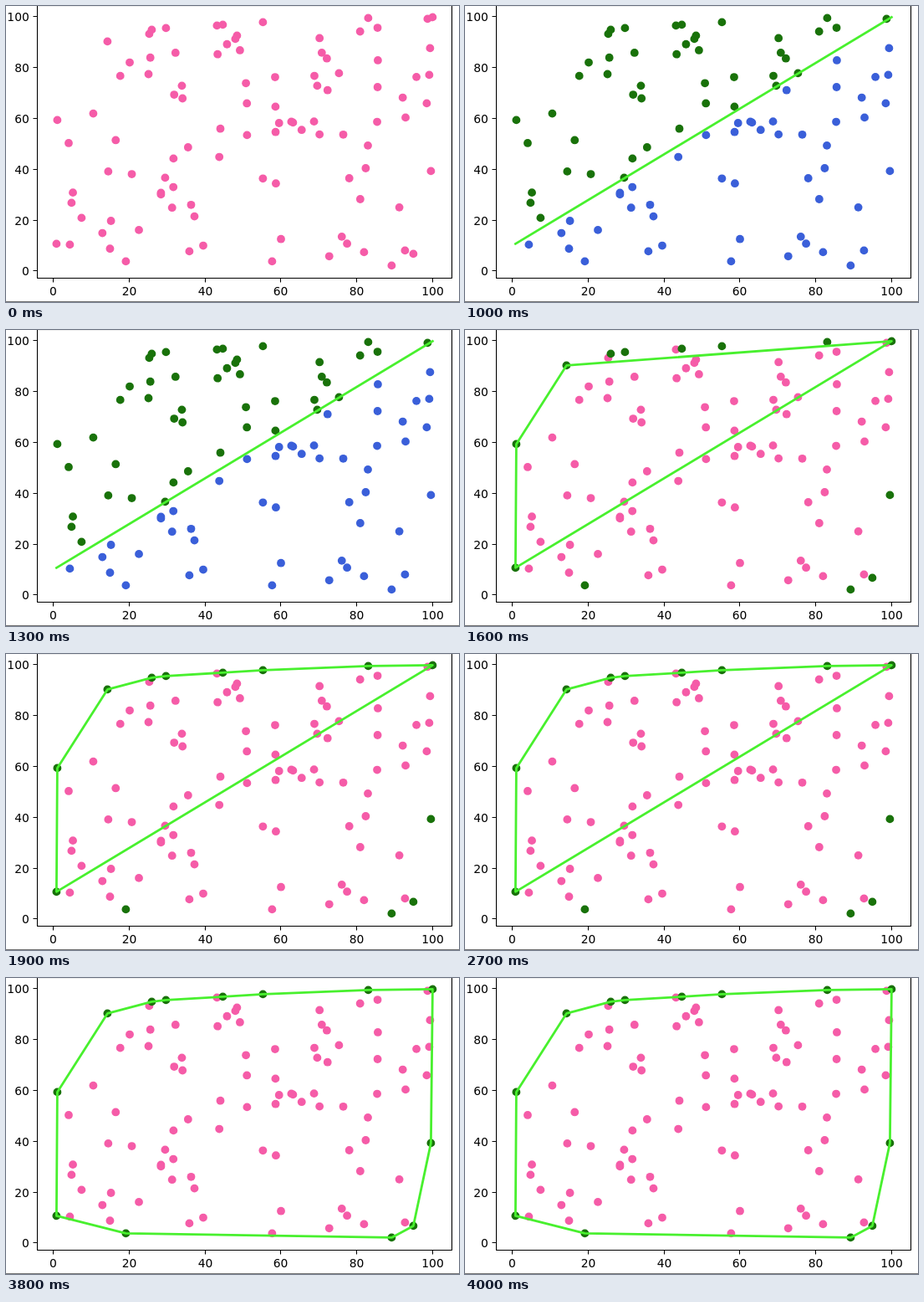
Recreate the animation shown at these times as an HTML page. Size 542 px wide and 354 px high, loop 4.8 s.

```html
<!DOCTYPE html>
<html lang="en">
<head>
<meta charset="utf-8">
<title>Convex hull</title>
<style>
html, body { margin: 0; width: 100%; height: 100%; overflow: hidden; background: #fff; }
svg { display: block; width: 542px; height: 354px; }
text { font: 13.89px "DejaVu Sans", sans-serif; fill: #000; stroke: none; }
</style>
</head>
<body>
<svg viewBox="0 0 542 354">
  <rect width="542" height="354" fill="#fff"/>
  <g transform="translate(.4 .4)">
    <g id="dots"></g>
    <path id="line" fill="none" stroke="#48f02e" stroke-width="2.8" stroke-linejoin="round" stroke-linecap="square"/>
  </g>
  <g id="axes" fill="none" stroke="#000" stroke-width="1.1"></g>
  <path d="M0 353.5H542" stroke="#777"/>
</svg>
<script>
const LOOP = 4800;
const PINK = '#f55ca8', GREEN = '#19720a', BLUE = '#3a5fd9';

// Hull corners in the order they join; the first two span the dividing line
const hull = [
  [60, 284], [510, 13], [121, 42], [61, 136], [191, 26], [174, 28], [307, 19],
  [433, 14], [259, 22], [487, 296], [508, 197], [461, 310], [143, 305]
];
// Inner points that touch a line or another point
const landmarks = [
  [171, 33], [252, 23], [504, 15], [190, 205], [372, 95], [398, 80], [322, 120], [288, 154],
  [76, 285], [428, 294], [477, 292], [318, 305], [219, 293], [507, 50], [506, 82], [503, 116],
  [78, 235], [90, 253], [276, 35], [274, 39], [341, 138], [343, 139], [185, 223], [185, 225]
];
// [start, number of corners joined]
const steps = [
  [0, 0], [1000, 2], [1600, 4], [1700, 5], [1800, 6], [1900, 8],
  [2500, 9], [2900, 10], [3200, 11], [3800, 13]
];
const UPPER = 40, LOWER = 47;   // inner points on each side of the line
const extremes = [0, 1, 2, 9];  // corners hidden while the set is split

const byId = id => document.getElementById(id);

function add(parent, tag, attrs, text = '') {
  const el = document.createElementNS('http://www.w3.org/2000/svg', tag);
  for (const key in attrs) el.setAttribute(key, attrs[key]);
  el.textContent = text;
  parent.append(el);
  return el;
}

// Signed distance of p from the line a-b, positive to the right on screen
function side(a, b, p) {
  const dx = b[0] - a[0], dy = b[1] - a[1];
  return (dx * (p[1] - a[1]) - dy * (p[0] - a[0])) / Math.hypot(dx, dy);
}
const height = p => -side(hull[0], hull[1], p);

function around(points) {
  const angle = ([x, y]) => Math.atan2(y - 160, x - 285);
  return [...points].sort((a, b) => angle(a) - angle(b));
}

function randomFrom(seed) {
  return () => (seed = seed * 48271 % 2147483647) / 2147483647;
}

// Fill the hull with scattered points, clear of its edges and the dividing line
function scatter() {
  const random = randomFrom(2024);
  const ring = around(hull), points = [...landmarks];
  let up = points.filter(p => height(p) > 0).length, down = points.length - up;
  while (up < UPPER || down < LOWER) {
    const p = [60 + 450 * random(), 13 + 297 * random()];
    const above = height(p) > 0;
    const inside = ring.every((a, i) => side(a, ring[(i + 1) % ring.length], p) > 8);
    const free = points.every(q => Math.hypot(p[0] - q[0], p[1] - q[1]) > 9);
    if (!inside || !free || Math.abs(height(p)) < 8) continue;
    if (above ? up >= UPPER : down >= LOWER) continue;
    points.push(p);
    above ? up++ : down++;
  }
  return points;
}

function drawAxes() {
  const axes = byId('axes');
  add(axes, 'path', { d: 'M37.5 0V325.5M533.5 0V325.5M37 325.5H534' });
  add(axes, 'path', { d: 'M38 0H533', stroke: '#ddd' });
  const snap = v => Math.floor(v) + 0.5;
  for (let v = 0; v <= 100; v += 20) {
    const x = snap(56.5 + 4.54 * v), y = snap(316.9 - 3.043 * v);
    add(axes, 'path', { d: `M${x} 325.5v5M37.5 ${y}h-5` });
    add(axes, 'text', { x, y: 346, 'text-anchor': 'middle' }, v);
    add(axes, 'text', { x: 27.8, y: y + 5.5, 'text-anchor': 'end' }, v);
  }
}

function addDot(point) {
  const el = add(byId('dots'), 'circle', { cx: point[0], cy: point[1], r: 4.9 });
  return { el, sideColor: height(point) > 0 ? GREEN : BLUE };
}

drawAxes();
const innerDots = scatter().map(addDot), hullDots = hull.map(addDot);

function render(ms) {
  const t = ms % LOOP;
  const joined = steps.filter(([start]) => start <= t).pop()[1];
  const split = joined === 2;
  const paint = (dot, color) => dot.el.setAttribute('fill', split ? dot.sideColor : color);
  innerDots.forEach(dot => paint(dot, PINK));
  hullDots.forEach((dot, i) => {
    paint(dot, joined ? GREEN : PINK);
    dot.el.setAttribute('visibility', split && extremes.includes(i) ? 'hidden' : 'visible');
  });
  const corners = around(hull.slice(0, joined)).map(p => p.join(' '));
  byId('line').setAttribute('d', joined ? `M${corners.join('L')}${split ? '' : 'Z'}` : '');
}

const begin = performance.now();
function tick() {
  render(performance.now() - begin);
  requestAnimationFrame(tick);
}
tick();
</script>
</body>
</html>
```
